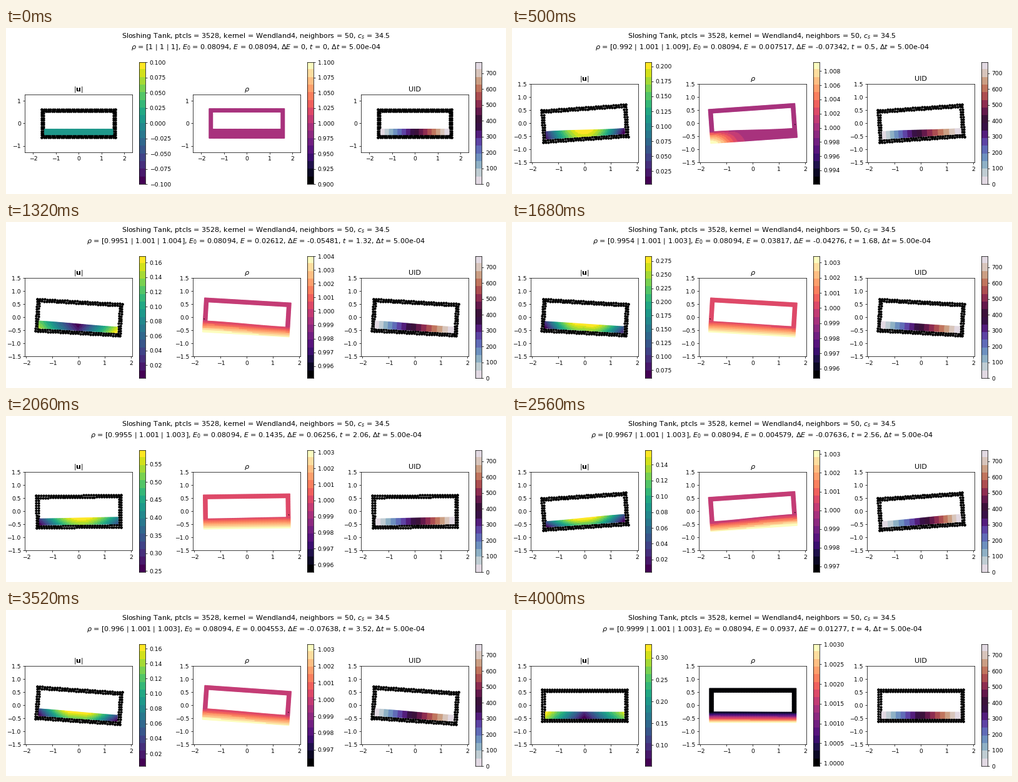
Recreate the animation shown at these times as a matplotlib script. Size 800x267 px, loop 4.02 s.

```python
import numpy as np
import matplotlib.pyplot as plt
from matplotlib.animation import FuncAnimation

W, H, DPI = 800, 267, 200 / 3
FRAMES, STEP = 201, 0.02
DX = 1 / 32              # particle spacing
NX, NY, LAYERS = 96, 8, 5
LEVELS = 16
TILT = np.radians(4)
E0 = 0.0809355

# t, energy, |u| min/max, rho min/max, surface lift, centre, right and top weight of |u|
KEYS = np.array([
    [0.00, E0, 0.0010, 0.300, 0.99700, 1.00400, 0.000, 0.1, 0.0, 0.0],
    [0.50, 0.007517, 0.0030, 0.2067, 0.99202, 1.00923, -0.045, 1.0, -0.05, 0.12],
    [1.00, 0.1350, 0.1500, 0.520, 0.99450, 1.00420, -0.040, 0.9, -0.1, 0.2],
    [1.32, 0.026124, 0.0022, 0.1685, 0.99510, 1.00400, -0.030, 0.0, 0.08, -0.15],
    [1.50, 0.0060, 0.0030, 0.190, 0.99530, 1.00350, -0.015, 0.7, 0.0, 0.1],
    [2.06, 0.1435, 0.2465, 0.589, 0.99553, 1.00312, 0.010, 1.0, 0.2, 0.3],
    [2.56, 0.004579, 0.0039, 0.158, 0.99668, 1.00320, 0.035, 0.9, 0.0, 0.35],
    [3.04, 0.115705, 0.1880, 0.484, 0.99450, 1.00336, 0.025, 0.6, 0.35, 0.4],
    [3.50, 0.0042, 0.0030, 0.165, 0.99600, 1.00330, -0.020, 0.8, 0.0, 0.2],
    [4.00, 0.0937045, 0.0516, 0.3306, 0.99992, 1.00300, -0.005, 0.1, -0.05, 0.15],
])


def state(t):
    """Ease between the neighbouring key states."""
    times = KEYS[:, 0]
    i = min(np.searchsorted(times, t + 1e-9, "right") - 1, len(times) - 2)
    s = (t - times[i]) / (times[i + 1] - times[i])
    s = (1 - np.cos(np.pi * s)) / 2
    return (KEYS[i] * (1 - s) + KEYS[i + 1] * s)[1:]


def rotate(x, y, a):
    c, s = np.cos(a), np.sin(a)
    return np.column_stack([x * c - y * s, x * s + y * c])


def rect(x, top, w, h):
    return [x / W, 1 - (top + h) / H, w / W, h / H]


def wall_particles():
    x = (np.arange(NX + 2 * LAYERS) + 0.5) * DX - 1.5 - LAYERS * DX
    y = (np.arange(32 + 2 * LAYERS) + 0.5) * DX - 0.5 - LAYERS * DX
    gx, gy = (g.ravel() for g in np.meshgrid(x, y))
    keep = (abs(gx) > 1.5) | (abs(gy) > 0.5)
    return gx[keep], gy[keep]


def beads():
    """Two rows of dots running round the tank wall."""
    pts = []
    for off in (0.039, 0.117):
        a, b = 1.5 + off, 0.5 + off
        nx, ny = round(2 * a / (3 * DX)), round(2 * b / (3 * DX))
        for x in np.linspace(-a, a, nx + 1):
            pts += [(x, -b), (x, b)]
        for y in np.linspace(-b, b, ny + 1):
            pts += [(-a, y), (a, y)]
    return np.array(pts).T


def surface(x, lift):
    return lift * np.sin(np.pi * np.clip(x, -1.5, 1.5) / 3)


wx, wy = wall_particles()
bx, by = beads()
col, row = (g.ravel() for g in np.meshgrid(np.arange(NX), np.arange(NY), indexing="ij"))
fx0 = (col + 0.5) * DX - 1.5
fz = (row + 0.5) / NY
right_spot = np.argmin(np.hypot(wx - 1.61, wy + 0.14))
left_spot = np.argmin(np.hypot(wx + 1.61, wy + 0.14))

fig = plt.figure(figsize=((W + 1e-6) / DPI, (H + 1e-6) / DPI), dpi=DPI, facecolor="white")
fig.text(0.5, 1 - 16 / H, "Sloshing Tank, ptcls = 3528, kernel = Wendland4, "
         "neighbors = 50, $c_s$ = 34.5", size=12, ha="center", va="baseline")
info = fig.text(0.5, 1 - 33 / H, "", size=12, ha="center", va="baseline")


def panel(i, title, cmap, walls):
    x = 30.3 + 269 * i
    cmap = plt.get_cmap(cmap, LEVELS)
    ax = fig.add_axes(rect(x, 90.5, 172, 126))
    ax.set_title(title, fontsize=12)
    dots = None
    if walls:
        dots, = ax.plot(bx, by, "o", color="k", ms=4.3 * 72 / DPI, mew=0)
    n = len(fx0) if walls else len(fx0) + len(wx)
    pts = ax.scatter(np.zeros(n), np.zeros(n), c=np.zeros(n), cmap=cmap,
                     s=(2.4 * 72 / DPI) ** 2, linewidths=0, zorder=3 if walls else 1)
    bar = fig.add_axes(rect(x + 183, 55.4, 9.8, 196))
    bar.imshow(np.arange(LEVELS)[:, None], cmap=cmap, origin="lower", aspect="auto",
               extent=(0, 1, 0, 1), transform=bar.transAxes, interpolation="nearest")
    bar.xaxis.set_visible(False)
    bar.set_xlim(0, 1)
    bar.yaxis.tick_right()
    bar.ticklabel_format(axis="y", useOffset=False)
    return ax, dots, pts, bar


panels = [panel(0, r"$|\mathbf{u}|$", "viridis", True),
          panel(1, r"$\rho$", "magma", False),
          panel(2, "UID", "twilight", True)]


def set_view(start):
    for i, (ax, *_) in enumerate(panels):
        x = 30.3 + 269 * i
        if start:
            ax.set_position(rect(x, 107.3, 172, 92.4))
            ax.set_xlim(-2.36, 2.36)
            ax.set_ylim(-1.27, 1.27)
            ax.set_yticks([-1, 0, 1])
        else:
            ax.set_position(rect(x, 90.5, 172, 126))
            ax.set_xlim(-2.05, 2.05)
            ax.set_ylim(-1.5, 1.5)
            ax.set_yticks(np.arange(-1.5, 1.6, 0.5))
        ax.set_xticks(np.arange(-2, 3))


def speed(x, lo, hi, centre, right, top):
    f = (centre * np.cos(np.pi * x / 3) + (1 - centre) * abs(x) / 1.5
         + right * x / 1.5 + top * fz)
    f = (f - f.min()) / (f.max() - f.min())
    return lo + (hi - lo) * f


def density(x, y, t, lift, hi):
    depth = np.clip((surface(x, lift) - 0.25 - y) / 0.4, 0, 1)
    corner = depth ** 0.6 * np.exp(-((x + 1.66) / 0.8) ** 2)
    w = np.clip((1 - t) / 0.4, 0, 1)    # first pressure wave
    return 1 + (hi - 1) * ((1 - w) * depth + w * corner)


def show(p, offsets, values, lo, hi):
    _, _, pts, bar = p
    pts.set_offsets(offsets)
    pts.set_array(values)
    pts.set_clim(lo, hi)
    bar.set_ylim(lo, hi)


def draw(k):
    t = k * STEP
    energy, ulo, uhi, rlo, rhi, lift, centre, right, top = state(t)
    angle = TILT * np.sin(np.pi * t)
    set_view(k == 0)

    x = fx0 + 3.8 * lift * np.cos(np.pi * fx0 / 3)
    y = -0.5 + fz * (0.25 + surface(x, lift))
    ax_, ay_ = np.r_[wx, x], np.r_[wy, y]

    if k == 0:
        u, rho = np.zeros_like(x), np.ones_like(ax_)
        ulo, uhi, rlo, rhi = -0.1, 0.1, 0.9, 1.1
        stats = (1, 1, 1)
    else:
        u = speed(x, ulo, uhi, centre, right, top)
        rho = density(ax_, ay_, t, lift, rhi)
        rho[left_spot if 1 < t < 2 else right_spot] = rlo
        stats = (rlo, 1 + 0.001 * min(1, t / 0.3), rhi)

    fluid = rotate(x, y, angle)
    show(panels[0], fluid, u, ulo, uhi)
    show(panels[1], rotate(ax_, ay_, angle), rho, rlo, rhi)
    show(panels[2], fluid, col * NY + row, 0, NX * NY - 1)
    wall = rotate(bx, by, angle)
    for p in (panels[0], panels[2]):
        p[1].set_data(wall[:, 0], wall[:, 1])

    lo, mid, hi = (f"{v:.4g}" for v in stats)
    info.set_text(rf"$\rho$ = [{lo} | {mid} | {hi}], $E_0$ = {E0:.4g}, $E$ = {energy:.4g}, "
                  rf"$\Delta E$ = {energy - E0:.4g}, $t$ = {t:.4g}, $\Delta t$ = 5.00e-04")
    return []


anim = FuncAnimation(fig, draw, frames=FRAMES, interval=20, init_func=lambda: [],
                     repeat=True, repeat_delay=0, cache_frame_data=False)
plt.show()
```
